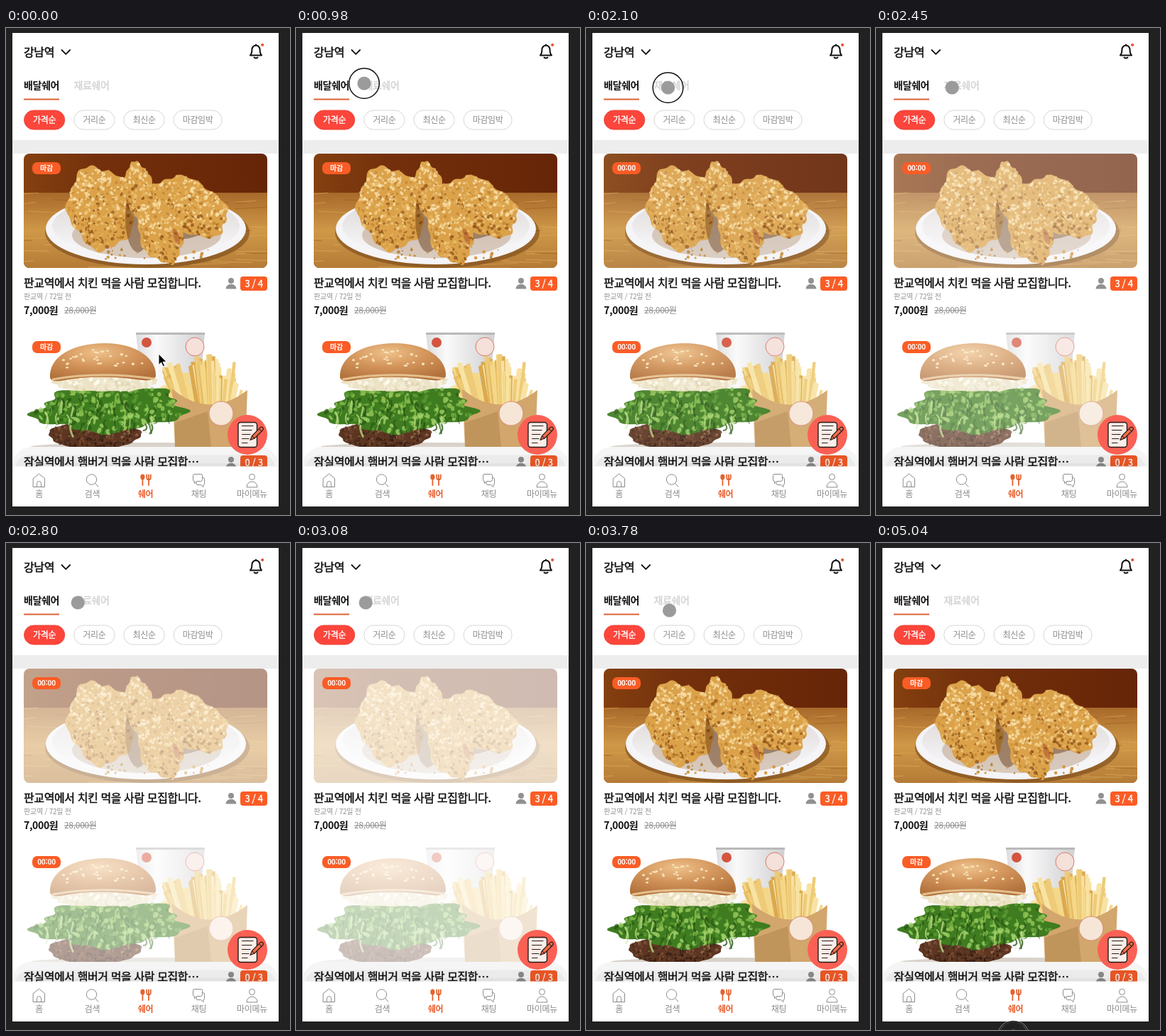
These frames come from a looping animation (400 px wide and 686 px high, 5.11 s). An HTML page:

```html
<!DOCTYPE html>
<html lang="ko">
<head>
<meta charset="utf-8">
<title>쉐어 목록</title>
<style>
  html, body { margin: 0; width: 100%; height: 100%; overflow: hidden; background: #212122; }
  svg { display: block; width: 100vw; height: 100vh; }
  text { font-family: "Noto Sans CJK KR", "Noto Sans CJK", "Noto Sans", sans-serif; letter-spacing: -.025em; white-space: pre; }
</style>
</head>
<body>
<svg id="stage" viewBox="0 0 400 686">
  <defs>
    <linearGradient id="wall">
      <stop offset="0" stop-color="#84400f"/><stop offset=".3" stop-color="#74300c"/><stop offset="1" stop-color="#662507"/>
    </linearGradient>
    <linearGradient id="table" x2="0" y2="1">
      <stop offset="0" stop-color="#a8692a"/><stop offset=".5" stop-color="#cf9848"/><stop offset="1" stop-color="#b47b36"/>
    </linearGradient>
    <linearGradient id="plate" x2="0" y2="1">
      <stop offset="0" stop-color="#dcd6d4"/><stop offset="1" stop-color="#fafafd"/>
    </linearGradient>
    <radialGradient id="bun" cx=".45" cy=".25" r=".75">
      <stop offset="0" stop-color="#eec18a"/><stop offset=".5" stop-color="#d2945a"/><stop offset="1" stop-color="#b3723c"/>
    </radialGradient>
    <linearGradient id="cup">
      <stop offset="0" stop-color="#dcdcde"/><stop offset=".3" stop-color="#fafafa"/><stop offset="1" stop-color="#d0d0d3"/>
    </linearGradient>
    <clipPath id="photo"><rect x="25" y="177" width="343" height="161" rx="8"/></clipPath>
    <clipPath id="screen"><rect x="9" y="7" width="375" height="667"/></clipPath>
  </defs>
</svg>
<script>
const NS = 'http://www.w3.org/2000/svg';
const stage = document.getElementById('stage');
const ORANGE = '#fa5c26', GREY = '#8b8b8b', INK = '#2b1a17';
const CARD_STEP = 252;

function el(parent, tag, attrs = {}) {
  const node = document.createElementNS(NS, tag);
  for (const k in attrs) node.setAttribute(k, attrs[k]);
  parent.appendChild(node);
  return node;
}
const group = (p, attrs) => el(p, 'g', attrs);
const rect = (p, x, y, width, height, fill, extra) => el(p, 'rect', { x, y, width, height, fill, ...extra });
const ellipse = (p, cx, cy, rx, ry, fill, extra) => el(p, 'ellipse', { cx, cy, rx, ry, fill, ...extra });
const circle = (p, cx, cy, r, fill, extra) => ellipse(p, cx, cy, r, r, fill, extra);
const shape = (p, d, fill, extra) => el(p, 'path', { d, fill, ...extra });
const line = (p, d, stroke, width, extra) => el(p, 'path', {
  d, fill: 'none', stroke, 'stroke-width': width, 'stroke-linecap': 'round', 'stroke-linejoin': 'round', ...extra
});

// Medium weight is a regular face with a hairline outline.
function label(p, x, y, str, size, weight, fill, anchor = 'start') {
  const medium = weight === 500;
  const t = el(p, 'text', {
    x, y, fill, 'font-size': size, 'font-weight': medium ? 400 : weight, 'text-anchor': anchor,
    stroke: medium ? fill : 'none', 'stroke-width': size * .03
  });
  t.textContent = str;
  return t;
}

let seed = 7;
const rnd = () => (seed = (seed * 16807) % 2147483647) / 2147483647;
const between = (a, b) => a + (b - a) * rnd();
const pick = list => list[Math.floor(rnd() * list.length)];

// Rough oval filled with grains, running through the shades from top to bottom.
function lump(p, cx, cy, rx, ry, turn, shades, grain, rough = .06) {
  const g = group(p, { transform: `translate(${cx} ${cy}) rotate(${turn})` });
  const phase = between(0, 6);
  const edge = a => 1 + rough * (Math.sin(5 * a + phase) + .6 * Math.sin(13 * a + 2 * phase));
  const at = (a, k) => [rx * k * Math.cos(a) * edge(a), ry * k * Math.sin(a) * edge(a)];
  const outline = Array.from({ length: 90 }, (_, i) => at(i * Math.PI / 45, 1));
  shape(g, `M${outline.join('L')}Z`, shades[Math.floor(shades.length / 2)]);
  const count = rx * ry / (grain * grain) * 1.6;
  for (let i = 0; i < count; i++) {
    const [x, y] = at(between(0, 2 * Math.PI), Math.sqrt(rnd()) * .98);
    const depth = (y / ry + 1) / 2 * .6 + .2 + between(-.45, .45);
    const index = Math.max(0, Math.min(shades.length - 1, Math.floor(depth * shades.length)));
    ellipse(g, x, y, between(.4, 1) * grain, between(.3, .8) * grain, shades[index],
      { opacity: .75, transform: `rotate(${between(0, 180)} ${x} ${y})` });
  }
}

function drawChicken(p) {
  const g = group(p, { 'clip-path': 'url(#photo)' });
  rect(g, 25, 177, 343, 161, 'url(#wall)');
  rect(g, 25, 232, 343, 106, 'url(#table)');
  for (let i = 0; i < 60; i++)
    line(g, `M${between(10, 350)} ${between(234, 338)}l${between(15, 60)} ${between(-3, 3)}`,
      pick(['#dca552', '#9a5c1e', '#e0ad60']), 1.5, { opacity: .45 });
  ellipse(g, 199, 288, 144, 50, '#6a3c12', { opacity: .5 });
  ellipse(g, 197, 283, 141, 50, '#f5f4f7');
  ellipse(g, 197, 279, 132, 44, 'url(#plate)');
  ellipse(g, 198, 292, 105, 32, '#b89c80', { opacity: .5 });
  const crust = ['#fbe6b4', '#f3d08a', '#e8b865', '#dba24a', '#c08030', '#8f5218'];
  const shadow = (...oval) => ellipse(g, ...oval, '#5c2d08', { opacity: .45 });
  shadow(240, 268, 52, 30);
  lump(g, 258, 252, 58, 37, 28, crust, 3.2);
  lump(g, 133, 254, 45, 59, -14, crust, 3.2);
  shadow(186, 268, 18, 48);
  lump(g, 187, 228, 20, 39, -9, crust, 3.2);
  lump(g, 217, 287, 30, 46, -20, crust, 3.2);
  ellipse(g, 240, 294, 4, 12, '#a54a26', { opacity: .5, transform: 'rotate(-18 240 294)' });
  for (let i = 0; i < 26; i++) circle(g, between(140, 290), between(308, 326), between(.8, 2.4), pick(['#d69a46', '#b8873f']));
}

function drawBurger(p) {
  const g = group(group(p, { transform: `translate(0 ${CARD_STEP})` }), { 'clip-path': 'url(#photo)' });
  const scene = group(g, { transform: `translate(0 ${-CARD_STEP})` });
  ellipse(scene, 190, 590, 155, 6, '#d8d2ca');
  shape(scene, 'M183 429H280L270 540H195Z', 'url(#cup)');
  shape(scene, 'M183 429H280V432H183Z', '#b9b8ba');
  circle(scene, 198, 443, 7, '#d3553f');
  circle(scene, 266, 449, 13, '#f5e0da', { stroke: '#d9796a' });

  for (let i = 0; i < 70; i++) {
    const lean = between(-1, 1), rise = between(0, 34);
    line(scene, `M${276 + lean * 57} ${459 + lean * lean * 18 + rise}L${284 + lean * 34} 560`,
      pick(['#f4d888', '#e8bd62', '#f8e3a4', '#dba94e', '#eecb78']), between(4, 7), { 'stroke-linecap': 'butt' });
  }
  shape(scene, 'M234 508Q285 552 340 510L337 590H238Z', '#d2a66c');
  shape(scene, 'M238 556L284 540L289 590H238Z', '#b58a52', { opacity: .6 });
  circle(scene, 303, 543, 17, '#f6e6d8', { stroke: '#d98b6e' });

  lump(scene, 125, 573, 65, 19, 0, ['#94684c', '#75482f', '#5d3622', '#452619', '#2f1a12'], 2.8, .03);
  lump(scene, 146, 537, 104, 31, -2, ['#9bcb5a', '#78b544', '#5a9a30', '#3f7c20', '#2b5c17', '#a5d46c'], 4.5, .1);
  for (let i = 0; i < 55; i++) {
    const a = between(0, 2 * Math.PI), k = Math.sqrt(rnd());
    line(scene, `M${146 + 98 * k * Math.cos(a)} ${539 + 27 * k * Math.sin(a)}q${between(-6, 6)} ${between(3, 9)} ${between(-4, 4)} ${between(8, 16)}`,
      pick(['#c0e288', '#2a5a15', '#8cc452', '#244d12']), between(1, 3), { opacity: .75 });
  }
  lump(scene, 138, 499, 74, 13, 0, ['#fffdf2', '#f5efdc', '#ece3c6', '#dcd2ac'], 4, .05);
  shape(scene, 'M62 493C60 463 94 444 139 444S213 466 211 491Q207 498 191 496Q130 487 77 497Q65 499 62 493Z', 'url(#bun)');
  line(scene, 'M66 495Q130 483 208 494', '#e5bf8e', 3);
  for (let i = 0; i < 34; i++) {
    const a = between(-1, 1);
    ellipse(scene, 138 + a * 60, between(451 + a * a * 18, 479), 1.9, 1.2, '#f8e3b9');
  }
}

const badges = [];
function drawCard(p, dy, title, count) {
  const g = group(p, { transform: `translate(0 ${dy})` });
  rect(g, 37, 189, 40, 17, ORANGE, { rx: 7 });
  badges.push(label(g, 57, 201.4, '마감', 10, 700, '#fff', 'middle'));
  label(g, 25, 365, title, 16, 500, '#111');
  circle(g, 317, 356, 4, '#919191');
  shape(g, 'M309.5 367.5a7.5 6.7 0 0 1 15 0Z', '#919191');
  rect(g, 330, 350, 38, 20, ORANGE, { rx: 4 });
  label(g, 349, 364.7, count, 13, 500, '#fff', 'middle');
  label(g, 25, 381.5, '판교역 / 72일 전', 10, 400, '#929292');
  label(g, 25, 403, '7,000원', 14, 700, '#111');
  label(g, 82, 402.3, '28,000원', 12, 400, GREY);
  rect(g, 82, 397.5, 45, 1, GREY);
}

function drawPills(p, charWidth, named) {
  let x = 25;
  ['가격순', '거리순', '최신순', '마감임박'].forEach((str, i) => {
    const w = str.length * charWidth + 26, on = i === 0;
    rect(p, x + .5, 116, w - 1, 27, on ? '#fc453b' : '#fff', { rx: 13.5, stroke: on ? '#ee463a' : '#d6d6d6' });
    if (named) label(p, x + w / 2, 134, str, 12, on ? 500 : 400, on ? '#fff' : GREY, 'middle');
    x += w + 12;
  });
}

const underline = (p, w) => rect(p, 25, 99.5, w, 2, '#dc6334');

const app = group(stage, { 'clip-path': 'url(#screen)' });
rect(app, 9, 7, 375, 667, '#fff');

const loaded = group(app);
label(loaded, 25, 39.8, '강남역', 16, 500, '#111');
label(loaded, 25, 85.7, '배달쉐어', 14, 700, '#111');
label(loaded, 95.5, 85.7, '재료쉐어', 14, 500, '#d2d2d2');
underline(loaded, 50);
drawPills(loaded, 10.74, true);
rect(loaded, 9, 158, 375, 19, '#ededed');
const photos = group(loaded);
drawChicken(photos);
drawBurger(photos);
drawCard(loaded, 0, '판교역에서 치킨 먹을 사람 모집합니다.', '3 / 4');
drawCard(loaded, CARD_STEP, '잠실역에서 햄버거 먹을 사람 모집합…', '0 / 3');

const bare = group(app);
underline(bare, 55);
drawPills(bare, 11.7, false);

const chevron = line(app, 'M78.5 31l5.8 5.8l5.8-5.8', '#111', 1.8);

// Bell
line(app, 'M344 38.5h16q-2.4-2.5-2.4-8a5.6 6 0 0 0-11.2 0q0 5.5-2.4 8Z', '#111', 2);
line(app, 'M352 23.5v1M349.5 41.5q2.5 2 5 0', '#111', 2);
circle(app, 361.2, 23.8, 2.1, '#e8562f');

// Stacked shadow above the tab bar
for (let i = 0; i < 3; i++)
  rect(app, 9 + 4 * i * i, 590 + 11.5 * i, 375 - 8 * i * i, 60, '#000', { rx: 27 - 7 * i, opacity: .04 });
rect(app, 9, 617.5, 375, 57, '#fff');

// Tab bar: each icon is drawn around its own centre
const tabs = group(app);
const fork = '#e3632f';
const icons = [
  ['홈', g => line(g, 'M-8-2.5l8-6.5l8 6.500v12h-16ZM-3 9v-4.500a3 3 0 0 1 6 0v4.500', GREY, 1)],
  ['검색', g => { circle(g, -1, -1, 7.2, 'none', { stroke: GREY }); line(g, 'M4.200 4.500l4.300 4.500', GREY, 1); }],
  ['쉐어', g => {
    ellipse(g, -4.1, -4.5, 3.1, 3.9, fork);
    line(g, 'M-4.100-2v9M1.700-7.500v4a2.800 2.800 0 0 0 5.600 0v-4M4.500-7.500v14.500', fork, 1.8);
  }],
  ['채팅', g => {
    line(g, 'M-6-8.500h9q2 0 2 2v6q0 2-2 2h-5.500l-3.500 3v-3q-2 0-2-2v-6q0-2 2-2Z', GREY, 1);
    line(g, 'M5-3.500h1q2 0 2 2v6q0 2-1.500 2v3l-3.500-3h-4.500q-2 0-2-2v-2', GREY, 1);
  }],
  ['마이메뉴', g => {
    circle(g, 0, -4.7, 4, 'none', { stroke: GREY });
    line(g, 'M-7.500 9.500a7.500 7.500 0 0 1 15 0Z', GREY, 1);
  }]
];
icons.forEach(([name, draw], i) => {
  const x = 46.5 + 75 * i, active = name === '쉐어';
  draw(group(app, { transform: `translate(${x} 637)` }));
  label(tabs, x, 661, name, 12, active ? 700 : 400, active ? '#e85b29' : GREY, 'middle');
});

// Write button
const fab = group(app);
const fabDisc = circle(fab, 340, 573, 28, '#fb6054');
rect(fab, 327, 555.5, 26.5, 35, '#fbeee8', { rx: 3.5, stroke: INK, 'stroke-width': 1.4 });
for (let i = 0; i < 5; i++) line(fab, `M332.5 ${560.5 + 6 * i}H${348 - 2 * i}`, INK, 1.2);
const pencil = group(fab, { transform: 'translate(344 580.5) rotate(-45)' });
shape(pencil, 'M0 0l6-2.500h16q3 0 3 2.500t-3 2.500h-16Z', '#f0704a', { stroke: INK, 'stroke-width': 1.2, 'stroke-linejoin': 'round' });
line(pencil, 'M6-2.500v5M20-2.500v5', INK, 1);

// Pointer
const arrow = shape(stage, 'M215 459v15.500l3.600-3.300l2.600 5.600l2.400-1.100l-2.600-5.400h5Z', '#000', { stroke: '#fff' });
const pointer = group(stage);
const ring = group(pointer);
circle(ring, 0, 0, 21.5, 'none', { stroke: '#fff', 'stroke-width': 2.6, opacity: .6 });
circle(ring, 0, 0, 21.3, 'none', { stroke: '#111', 'stroke-width': 1.5 });
circle(pointer, 0, 0, 9.6, '#989898', { opacity: .97 });

const LOOP = 5110, STEP = 70;
const track = [
  { t: 0, x: 215, y: 459 }, { t: 560, x: 96, y: 78 }, { t: 1400, x: 96, y: 78 }, { t: 1750, x: 112.5, y: 84.5 },
  { t: 2100, x: 115.5, y: 84 }, { t: 3500, x: 96.5, y: 84 }, { t: 3780, x: 117.5, y: 95 },
  { t: 4690, x: 193.5, y: 695 }, { t: LOOP, x: 193.5, y: 695 }
];
const easeOut = u => u * (2 - u);
function pointerAt(t) {
  const i = track.findIndex(k => k.t > t), a = track[i - 1], b = track[i];
  const s = easeOut((t - a.t) / (b.t - a.t));
  return [a.x + (b.x - a.x) * s, a.y + (b.y - a.y) * s];
}

const show = (node, on) => node.setAttribute('display', on ? 'inline' : 'none');
const inside = (t, a, b) => t >= a && t < b;

function render(t) {
  const blank = inside(t, 1400, 1890);
  show(loaded, !blank);
  show(tabs, !blank);
  show(bare, blank);
  chevron.setAttribute('transform', `translate(${blank ? '3.7 -1' : '0 0'})`);
  fab.setAttribute('transform', `translate(0 ${blank ? -1 : 0})`);
  fabDisc.setAttribute('fill', blank ? '#f57463' : '#fb6054');
  photos.setAttribute('opacity', inside(t, 1980, 3580) ? 1 - (t - 1980) / 1600 : 1);
  const timer = inside(t, 1890, 4410) ? '00:00' : '마감';
  badges.forEach(b => { if (b.textContent !== timer) b.textContent = timer; });
  show(arrow, t < STEP);
  show(pointer, t >= STEP);
  show(ring, inside(t, 840, 1050) || inside(t, 2030, 2240) || t >= 5040);
  pointer.setAttribute('transform', `translate(${pointerAt(t)})`);
}

function tick() {
  render(Math.floor((performance.now() % LOOP) / STEP) * STEP);
  requestAnimationFrame(tick);
}
tick();
</script>
</body>
</html>
```
